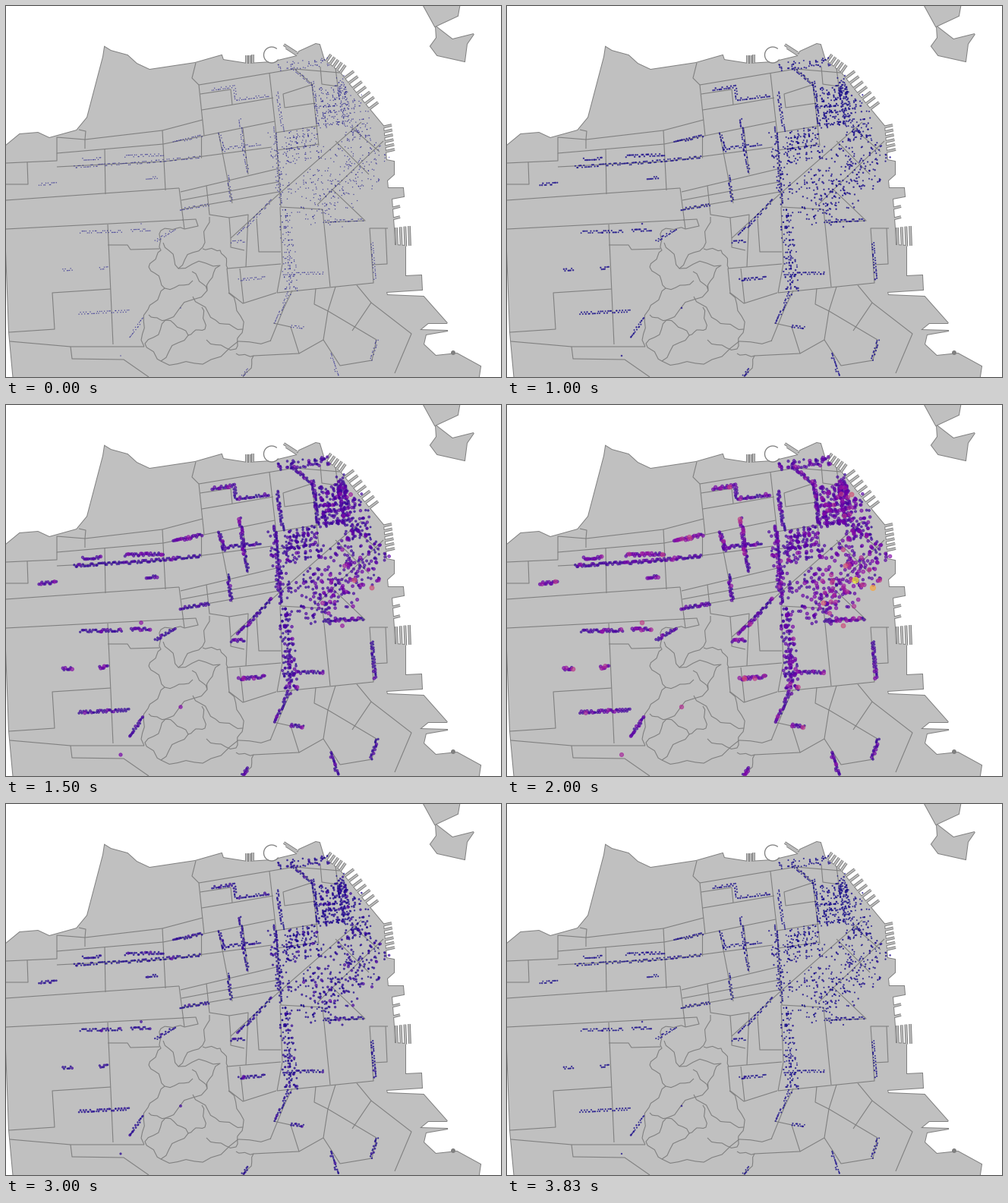
Animation, 652 px wide and 489 px high, one loop 4000 ms. Source, as a matplotlib script:

```python
import numpy as np
import matplotlib.pyplot as plt
from matplotlib.animation import FuncAnimation
from matplotlib.collections import LineCollection
from matplotlib.patches import Arc, Circle, Polygon

W, H, DPI = 652, 489, 64
PX = 72 / DPI
HOURS, LOOP_MS = 24, 4000
LAND, LINE = "#c0c0c0", "#808080"

NORTH_SHORE = [
    (10, 495), (4, 430), (-5, 188), (18, 169), (42, 167), (57, 174), (93, 164),
    (107, 147), (128, 67), (130, 54), (138, 59), (160, 65), (172, 76), (189, 84),
    (249, 75), (284, 65), (286, 71), (318, 76), (350, 74), (383, 66), (386, 60),
    (408, 50), (413, 51), (419, 71),
]
EAST_SHORE = [
    (440, 88), (468, 123), (497, 158), (501, 203), (511, 205), (511, 222), (502, 230),
    (503, 240), (523, 240), (524, 251), (508, 254), (511, 293), (512, 315), (526, 316),
    (526, 356), (547, 355), (548, 374), (501, 377), (502, 381), (550, 383), (581, 418),
    (556, 418), (545, 427), (582, 428), (553, 433), (550, 446), (566, 461), (594, 458),
    (625, 475), (622, 495),
]
ISLANDS = [
    [(548, -4), (565, 27), (595, 13), (598, -4)],
    [(566, 27), (567, 42), (559, 53), (568, 65), (604, 73), (607, 50), (616, 37), (588, 44)],
]
# first root, last root, reach, count
PIER_ROWS = [
    ((317, 76), (325, 75), (0, -11), 3), ((421, 74), (440, 88), (7, -10), 5),
    ((446, 95), (478, 136), (12, -9), 7), ((495, 160), (499, 192), (13, -3), 6),
    ((515, 318), (532, 316), (-1, -26), 4), ((507, 267), (507, 281), (12, -3), 2),
    ((366, 51), (369, 55), (17, 11), 2),
]

WEST = [
    [(96, 163), (105, 165), (104, 176), (206, 164), (259, 150)],
    [(104, 188), (104, 176), (67, 173), (67, 194), (207, 182), (354, 152)],
    [(0, 207), (67, 204), (67, 194)],
    [(28, 206), (29, 235), (0, 235)],
    [(67, 212), (208, 205), (350, 186)],
    [(130, 188), (131, 248)],
    [(206, 164), (210, 243)],
    [(0, 256), (228, 240)],
    [(0, 294), (233, 282)],
    [(134, 288), (141, 446)],
    [(138, 373), (61, 378), (64, 426), (4, 430)],
    [(5, 442), (85, 449), (182, 449)],
    [(85, 449), (87, 465), (155, 466), (188, 489)],
    [(134, 315), (160, 315), (164, 321), (202, 320)],
]
NORTH = [
    [(250, 75), (245, 95), (254, 104), (261, 171)],
    [(254, 104), (380, 83), (440, 88)],
    [(256, 116), (296, 110), (298, 130)],
    [(258, 137), (352, 121)],
    [(347, 89), (355, 160), (362, 265)],
    [(380, 83), (403, 103), (412, 184)],
    [(405, 103), (365, 116), (367, 134), (408, 128)],
    [(355, 167), (411, 158)],
    [(414, 80), (416, 103), (437, 106), (434, 82)],
    [(357, 190), (412, 182)],
    [(257, 171), (257, 200)],
    [(280, 167), (298, 260)],
    [(312, 161), (319, 222)],
]
CENTER = [
    [(228, 240), (235, 294)],
    [(230, 245), (356, 215)],
    [(231, 256), (358, 232)],
    [(231, 268), (359, 245)],
    [(264, 237), (268, 275), (294, 279)],
    [(232, 282), (250, 281), (253, 290), (235, 294)],
    [(314, 322), (296, 318), (296, 306), (358, 249), (468, 153)],
    [(296, 306), (294, 279), (319, 275), (316, 344)],
    [(330, 280), (333, 324), (362, 324)],
    [(362, 340), (291, 346), (294, 378), (312, 392), (356, 378)],
    [(308, 346), (313, 392)],
]
EAST = [
    [(362, 265), (417, 268), (427, 370)],
    [(361, 265), (364, 340), (357, 378)],
    [(357, 378), (484, 365), (479, 293), (503, 293)],
    [(500, 293), (502, 340), (483, 341)],
    [(420, 285), (473, 283), (430, 242), (410, 262)],
    [(430, 242), (497, 178)],
    [(434, 178), (478, 222)],
    [(455, 160), (492, 192)],
    [(377, 375), (366, 398), (348, 442)],
    [(352, 418), (375, 423), (386, 458), (326, 461)],
    [(408, 372), (406, 393), (424, 402), (434, 370)],
    [(424, 402), (418, 440), (386, 458)],
    [(424, 402), (488, 440), (482, 467), (440, 474), (418, 440)],
    [(462, 368), (481, 391), (534, 432), (512, 484)],
    [(481, 391), (456, 428)],
]
# Winding hill roads, bent by a rule between these points
HILLS = [
    [(235, 294), (204, 296), (204, 322), (188, 344)],
    [(207, 312), (227, 346), (259, 318), (268, 278)],
    [(259, 320), (282, 322), (292, 346)],
    [(227, 346), (282, 342), (265, 375), (245, 350)],
    [(188, 344), (209, 372), (187, 400), (182, 449)],
    [(209, 372), (246, 362)],
    [(188, 407), (210, 414), (265, 375)],
    [(246, 383), (276, 414), (312, 426)],
    [(210, 414), (183, 445), (204, 468), (240, 434), (210, 414)],
    [(240, 434), (262, 426), (258, 397)],
    [(264, 440), (303, 452), (312, 426), (293, 378)],
    [(204, 468), (270, 466), (349, 441)],
    [(303, 458), (326, 461), (312, 489)],
]

# Metered streets: x0, y0, x1, y1
BUSY_STREETS = [
    (101, 202, 125, 201), (157, 198, 207, 196), (185, 227, 199, 226), (44, 235, 66, 234),
    (221, 180, 258, 171), (165, 296, 190, 295), (75, 348, 87, 347), (123, 346, 134, 345),
    (307, 361, 341, 358), (271, 110, 301, 106), (308, 149, 313, 190), (297, 311, 314, 310),
]
QUIET_STREETS = [
    (90, 212, 150, 208), (152, 209, 256, 199), (98, 298, 152, 297), (197, 310, 222, 294),
    (96, 405, 162, 402), (162, 436, 181, 412), (229, 268, 267, 262), (301, 109, 303, 124),
    (305, 123, 346, 118), (313, 190, 319, 219), (281, 167, 287, 192), (286, 188, 335, 182),
    (292, 224, 297, 257), (306, 302, 350, 256), (366, 353, 418, 352), (355, 418, 372, 378),
    (311, 488, 319, 479), (375, 422, 392, 424), (427, 458, 437, 488), (481, 466, 489, 440),
    (357, 114, 365, 165), (354, 160, 362, 262), (380, 84, 404, 104), (404, 100, 411, 158),
    (482, 312, 486, 360), (418, 284, 470, 282),
]
# Metered blocks: x, y, width, height, angle, count
BLOCKS = [
    (352, 77, 72, 9, -6, 50), (406, 110, 40, 52, -8, 210), (436, 92, 11, 28, -8, 34),
    (441, 120, 30, 58, -8, 90), (366, 166, 46, 44, -8, 130), (346, 166, 20, 84, -8, 52),
    (364, 248, 142, 58, -42, 210), (398, 258, 90, 46, -42, 74), (361, 268, 15, 110, -3, 125),
]
# x, y, weight
HOT_SPOTS = [
    (459, 231, 1), (482, 241, .8), (446, 212, .52), (417, 261, .54), (443, 291, .5),
    (313, 361, .52), (178, 287, .45), (230, 398, .4), (454, 118, .52), (151, 461, .36),
]
CENTER_OF_DEMAND = HOT_SPOTS[0][:2]


def demand(hour):
    return np.interp(hour, [4, 6, 9, 12, 15, 18, 21, 23], [0, .06, .64, 1, .88, .17, .1, 0])


def winding(points, rng):
    """Bend each leg of a path with a slow and a quick wave."""
    path = []
    t = np.linspace(0, 1, 7)
    for a, b in zip(np.array(points[:-1]), np.array(points[1:])):
        step = b - a
        normal = np.array([-step[1], step[0]])
        bend = rng.uniform(-.1, .1) * np.sin(np.pi * t) + .05 * np.sin(3 * np.pi * t)
        path.extend(a + np.outer(t, step) + np.outer(bend, normal))
    return path


def build_piers():
    piers = []
    for first, last, reach, count in PIER_ROWS:
        for root in np.linspace(first, last, count):
            piers.append([root, root + reach])
    return piers


def build_meters(rng):
    spots = []

    def add(xs, ys, weight):
        gap = np.hypot(xs - CENTER_OF_DEMAND[0], ys - CENTER_OF_DEMAND[1])
        pull = 1 + .7 * np.exp(-(gap / 45) ** 2)
        spread = weight * pull * rng.lognormal(0, .45, len(xs))
        spots.append(np.column_stack([xs, ys, np.minimum(spread, .45)]))

    def add_street(x0, y0, x1, y1, weight):
        dx, dy = x1 - x0, y1 - y0
        length = np.hypot(dx, dy)
        n = int(length / 1.9) + 2
        t = np.linspace(0, 1, n) + rng.normal(0, .2 / n, n)
        side = rng.choice([-1.2, 1.2], n) / length
        add(x0 + dx * t - dy * side, y0 + dy * t + dx * side, weight)

    def add_block(x, y, w, h, angle, n, gap=8):
        u, v = rng.uniform(0, w, n), rng.uniform(0, h, n)
        along = rng.random(n) < .5
        curb = rng.choice([-1, 1], n)
        u = np.where(along, u, np.round(u / gap) * gap + curb)
        v = np.where(along, np.round(v / gap) * gap + curb, v)
        c, s = np.cos(np.radians(angle)), np.sin(np.radians(angle))
        add(x + c * u - s * v, y + s * u + c * v, .125)

    for street in BUSY_STREETS:
        add_street(*street, .2)
    for street in QUIET_STREETS:
        add_street(*street, .115)
    for block in BLOCKS:
        add_block(*block)
    meters = np.vstack(spots + [HOT_SPOTS])
    return meters[np.argsort(meters[:, 2], kind="stable")]


def draw_map(ax):
    for shape in [NORTH_SHORE + EAST_SHORE] + ISLANDS:
        ax.add_patch(Polygon(shape, fc=LINE, ec=LINE, lw=2 * PX, zorder=1))
        ax.add_patch(Polygon(shape, fc=LAND, lw=0, zorder=2))
    piers = build_piers()
    ax.add_collection(LineCollection(piers, colors=LINE, lw=3.8 * PX, zorder=1))
    ax.add_collection(LineCollection(piers, colors=LAND, lw=1.8 * PX, zorder=2))
    ax.add_patch(Circle((350, 64.5), 10, fc="white", lw=0, zorder=3))
    ax.add_patch(Arc((350, 64.5), 21, 21, theta1=35, theta2=310, ec=LINE, lw=1.3 * PX, zorder=3))
    ax.add_patch(Circle((589, 457), 3, fc=LINE, lw=0, zorder=3))
    rng = np.random.default_rng(5)
    borders = WEST + NORTH + CENTER + EAST + [winding(road, rng) for road in HILLS]
    ax.add_collection(LineCollection(borders, colors=LINE, lw=1.1 * PX, zorder=4))


fig = plt.figure(figsize=(W / DPI, H / DPI), dpi=DPI, facecolor="white")
ax = fig.add_axes([0, 0, 1, 1])
ax.set(xlim=(0, W), ylim=(H, 0))
ax.axis("off")
draw_map(ax)

x, y, weights = build_meters(np.random.default_rng(7)).T
evening = np.random.default_rng(3).lognormal(0, .45, len(x))
dots = ax.scatter(x, y, c=weights, s=1, cmap="plasma", vmin=0, vmax=1,
                  alpha=.65, linewidths=.9 * PX, zorder=5)


def update(hour):
    level = demand(hour)
    values = level * np.minimum(weights, .2 + level)
    if hour >= 18:
        values = values * evening
    diameter = .5 + 7.4 * values ** .45
    dots.set_sizes((diameter * PX) ** 2)
    dots.set_array(values)
    return dots,


anim = FuncAnimation(fig, update, frames=HOURS, interval=LOOP_MS / HOURS,
                     repeat=True, repeat_delay=0)
plt.show()
```
